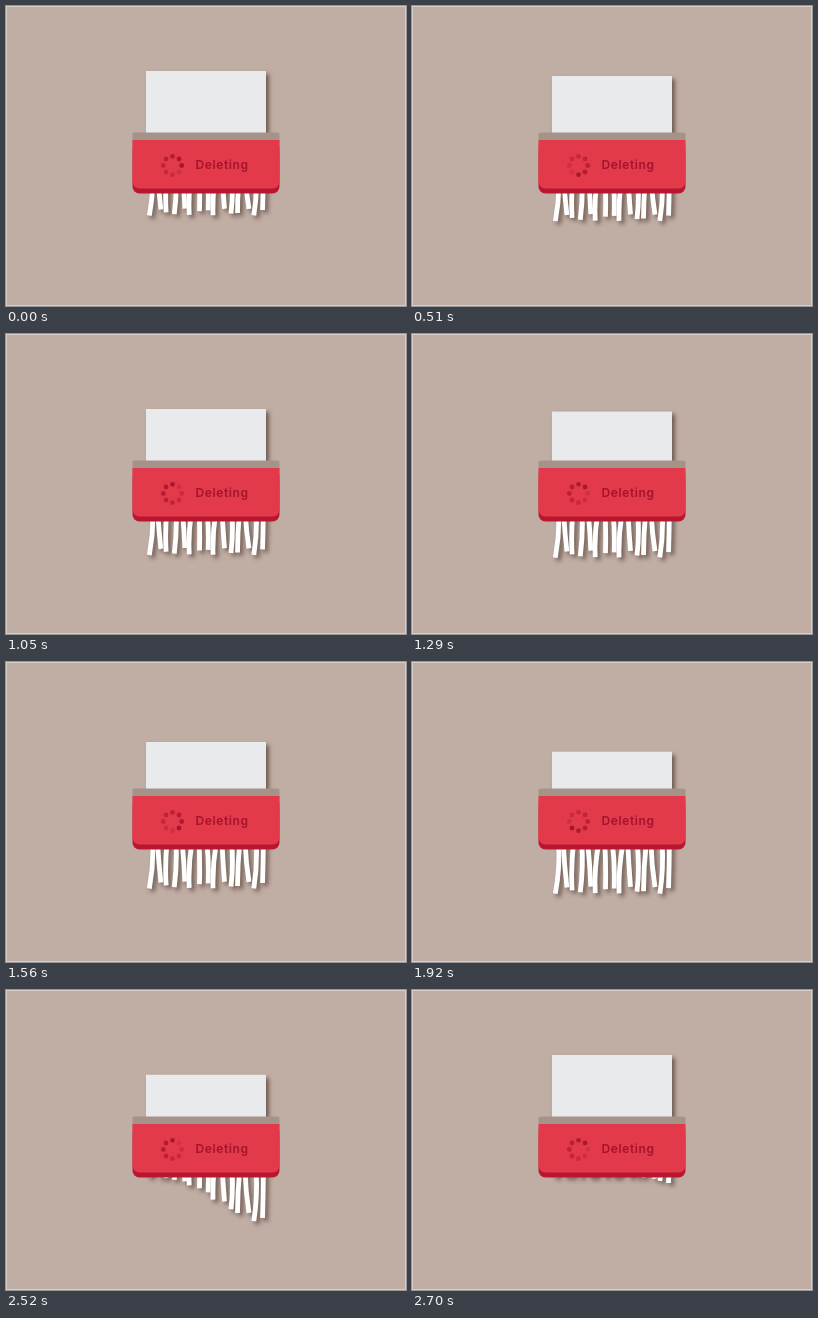
Animation, 400 px wide and 300 px high, one loop 2.73 s. Source, as an HTML page with a canvas:

```html
<!DOCTYPE html>
<html>
<head>
<meta charset="utf-8">
<style>
  html, body { margin: 0; height: 100%; overflow: hidden; background: #c0ada3; }
  canvas { display: block; }
</style>
</head>
<body>
<canvas id="stage" width="400" height="300"></canvas>
<script>
const ctx = document.getElementById('stage').getContext('2d');
const LOOP = 2730;
const SPIN = LOOP / 2;
const STRIPS = 15;
const SLOT_Y = 187;

const clamp = v => Math.max(0, Math.min(1, v));
const easeInOut = p => p < .5 ? 2 * p * p : 1 - 2 * (1 - p) ** 2;
const ramp = (t, start, length) => clamp((t - start) / length);

function setShadow(on) {
  ctx.shadowColor = on ? 'rgba(60,38,30,.6)' : 'transparent';
  ctx.shadowBlur = 4;
  ctx.shadowOffsetX = ctx.shadowOffsetY = 3;
}

function box(x, y, w, h, radii, fill) {
  ctx.fillStyle = fill;
  ctx.beginPath();
  ctx.roundRect(x, y, w, h, radii);
  ctx.fill();
}

// A rigid curved ribbon that slides down, then is pulled back in, left to right.
function drawStrip(i, t) {
  const x = 145 + 8 * i;
  const lean = 2 * Math.sin(i * 2.3 - 1);
  const bow = 3 * Math.cos(i * 1.9);
  const fed = 17 * ramp(t, 0, 1560) + 8.5 * ramp(t, 1560, 600);
  const low = 206 + 3.5 * Math.cos(i * 2.4) + fed;
  const tip = low + (SLOT_Y - low) * easeInOut(ramp(t, 2215 + i * 19, 300));
  ctx.beginPath();
  ctx.moveTo(x - lean, tip - 50);
  ctx.quadraticCurveTo(x + bow, tip - 25, x + lean, tip);
  ctx.stroke();
}

function drawSpinner(t) {
  ctx.fillStyle = '#a3132a';
  for (let i = 0; i < 8; i++) {
    const angle = i * Math.PI / 4;
    const age = (t / SPIN + 1 - i / 8) % 1;
    ctx.globalAlpha = .95 - .75 * age;
    ctx.beginPath();
    ctx.arc(166.5 + 9.2 * Math.cos(angle), 159.5 + 9.2 * Math.sin(angle), 2.4, 0, 7);
    ctx.fill();
  }
  ctx.globalAlpha = 1;
}

function draw(t) {
  ctx.fillStyle = '#c0ada3';
  ctx.fillRect(0, 0, 400, 300);
  ctx.strokeStyle = 'rgba(255,255,255,.4)';
  ctx.lineWidth = 1;
  ctx.strokeRect(.5, .5, 399, 299);

  const top = 65 + 15 * ramp(t, 0, 1560) + 16 * ramp(t, 1560, 600)
    - 31 * easeInOut(ramp(t, 2381, 330));
  setShadow(true);
  box(140, top, 120, 150 - top, 0, '#e8eaec');

  ctx.save();
  ctx.beginPath();
  ctx.rect(120, 180, 160, 70);
  ctx.clip();
  ctx.strokeStyle = '#fff';
  ctx.lineWidth = 4.8;
  for (let i = 0; i < STRIPS; i++) drawStrip(i, t);
  ctx.restore();
  setShadow(false);

  box(126.5, 140, 147, 47.5, [0, 0, 7, 7], '#b9172f');
  box(126.5, 126.5, 147, 20, [2, 2, 0, 0], '#a59389');
  box(126.5, 134, 147, 48.5, [0, 0, 7, 7], '#e23a4b');

  drawSpinner(t);
  ctx.fillStyle = '#a3132a';
  ctx.font = '600 12px Inter, sans-serif';
  ctx.letterSpacing = '0.6px';
  ctx.fillText('Deleting', 189.5, 163);
}

function frame() {
  draw(performance.now() % LOOP);
  requestAnimationFrame(frame);
}
frame();
</script>
</body>
</html>
```
